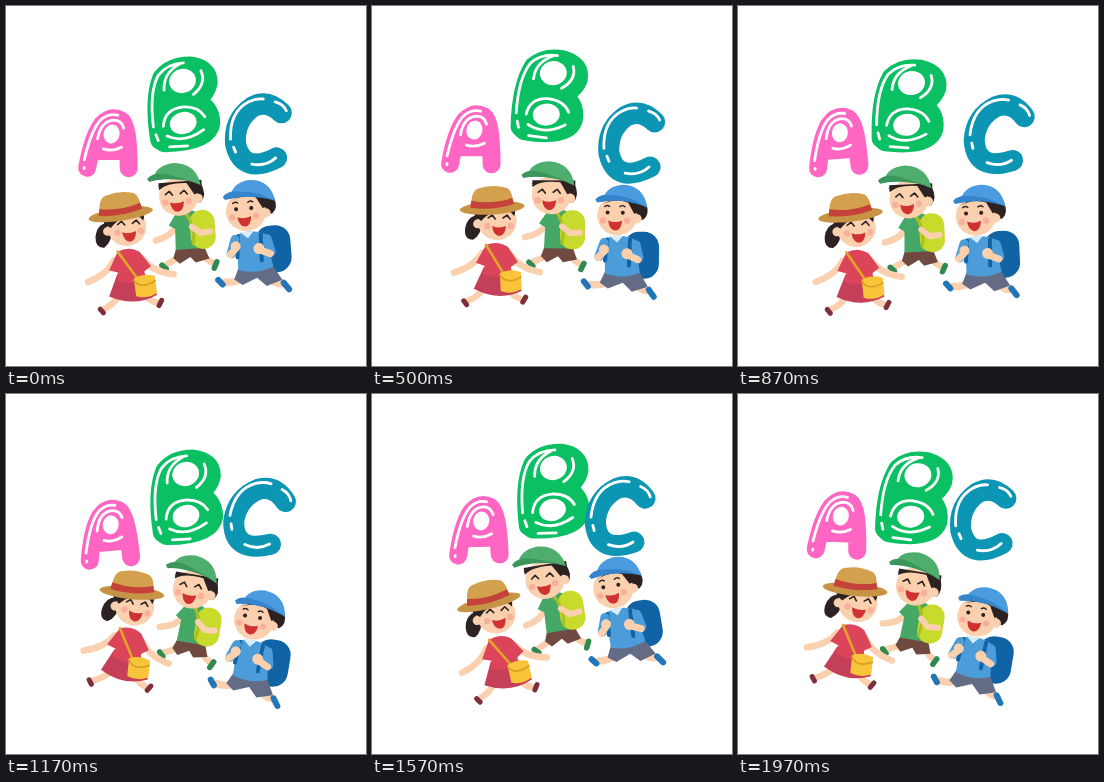
Recreate the animation shown at these times as an HTML page. Size 360x360 px, loop 2000 ms.

```html
<!DOCTYPE html>
<html lang="en">
<head>
<meta charset="utf-8">
<title>ABC kids</title>
<style>
html, body { margin: 0; width: 100%; height: 100%; overflow: hidden; background: #fff; }
svg { display: block; width: 100vw; height: 100vh; stroke-linecap: round; stroke-linejoin: round; }
</style>
</head>
<body>
<svg viewBox="0 0 360 360"></svg>
<script>
const SKIN = '#fbd0ae', HAIR = '#2c2221', PINK = '#ff66c4', GREEN = '#0bbf63', TEAL = '#0d95b4';

const fill = (color, d) => `<path fill="${color}" d="${d}"/>`;
const line = (color, width, d, inside = 'none') =>
  `<path fill="${inside}" stroke="${color}" stroke-width="${width}" d="${d}"/>`;
const oval = (color, x, y, rx, ry = rx, turn = 0) =>
  `<ellipse fill="${color}" cx="${x}" cy="${y}" rx="${rx}" ry="${ry}" transform="rotate(${turn} ${x} ${y})"/>`;
const shine = d => line('#fff', 2.8, d);

// Head of radius r; the ear sits on side -1 or 1, eyes are closed or round.
function face(x, y, r, ear, closed) {
  const eye = ex => closed
    ? line(HAIR, 1.6, `M${ex - 3.5} ${y - 3}l4-3l3 4`)
    : oval(HAIR, ex, y - 3, 2) + line(HAIR, 1.4, `M${ex - 3} ${y - 9}q3-2 5 0`);
  const mx = x - ear * 2;
  return oval(SKIN, x, y, r, r * .98) + oval(SKIN, x + ear * r, y + 3, 4.5)
    + [-1, 1].map(s => oval('#f8b09c', mx + s * r * .6, y + 5, 3.2) + eye(mx + s * r * .38)).join('')
    + fill('#d0332f', `M${mx - 7} ${y + 5}q7 3 14 0q-1 10-7 10q-6-1-7-10`);
}

const letterA = line(PINK, 18, 'M81 157Q86 127 95 114Q104 104 114 109Q122 114 122.5 157M91 140H120')
  + fill(PINK, 'M92 142L97 112H116L119 142Z')
  + oval('#fff', 105, 123, 8, 9.5, 12)
  + shine('M78 149Q85 117 95 108Q102 102 111 104M91 128Q94 110 107 109Q115 109 117 117M78 157v1M97 138Q106 141 115 136');

const letterB = line(GREEN, 20, 'M156 126Q152 86 162 65Q172 54 190 55Q208 58 207 72Q204 84 190 90Q208 95 207 113Q203 131 160 129Z', GREEN)
  + oval('#fff', 182, 69, 13.5, 12, -15) + oval('#fff', 180, 111, 13.5, 11, -12)
  + shine('M150 113Q148 78 158 62Q167 51 184 51M163 77Q163 60 180 52M201 60Q206 73 192 83'
    + 'M160 113Q162 96 180 95Q196 95 202 106M163 123Q180 132 200 119M152 121l2 6M165 134h18');

const letterC = line(TEAL, 21, 'M282 115Q268 101 253 109Q234 122 236 146Q243 177 277 160')
  + shine('M231 141Q230 114 249 104Q257 100 264 101M276 104Q284 106 287 113M252 166Q266 169 276 160M234 149l2 5');

const greenBoy = line(SKIN, 6.5, 'M176 254L157 263M193 254Q198 262 205 265M171 224Q165 235 149 238')
  + line('#2f8a50', 5.5, 'M153 263l4 4M205 270l3-6')
  + fill('#704a40', 'M169 246H196L201 260L187 263L182 257L171 263L165 257Z')
  + fill('#46a866', 'M172 211Q185 207 193 214L198 249H168L169 228L163 224Z')
  + `<rect x="184" y="211" width="25" height="39" rx="12" fill="#c8da2c"/>`
  + line('#a9bf22', 3, 'M180 212Q190 226 186 244')
  + line(SKIN, 6, 'M186 227L194 234L204 233')
  + fill(HAIR, 'M155 184H198Q204 196 197 203H185Z')
  + face(175, 196, 19.5, 1, true)
  + fill(HAIR, 'M156 188Q164 181 184 183L191 195L199 192V181H156Z')
  + fill('#4fae6d', 'M151 178Q153 163 173 162Q195 164 198 186Q173 174 151 178Z')
  + fill('#3a965a', 'M145 176Q151 169 166 173L194 183Q164 175 147 179Z');

const blueBoy = line(SKIN, 7.5, 'M237 278Q228 287 215 285M258 281Q263 291 272 291')
  + line('#2276b5', 6, 'M208 282l4 5M273 290l5 7')
  + `<rect x="248" y="232" width="35" height="47" rx="15" fill="#1064a6"/>`
  + fill('#646b84', 'M231 268H261L272 287L256 292L247 283L232 289L224 283Z')
  + fill('#4b9cd8', 'M229 239Q244 233 259 240L264 273Q247 280 229 274Z')
  + line('#1064a6', 4, 'M231 240L229 261M254 240L253 266')
  + line('#4b9cd8', 9, 'M228 243L223 257M260 245L263 258')
  + line(SKIN, 7, 'M222 258l6-6M262 260l-9-4')
  + oval(SKIN, 228, 250, 5) + oval(SKIN, 251, 254, 5.5)
  + fill('#d9ecf9', 'M233 236H247L241 243Z')
  + fill(HAIR, 'M228 202Q252 193 270 204Q274 215 267 220H258Z')
  + face(241, 216, 20, 1, false)
  + fill(HAIR, 'M225 205Q240 198 252 203L258 214L269 211V201L249 194Z')
  + fill('#4b9be0', 'M226 202Q229 186 247 185Q268 186 271 208Q251 196 226 202Z')
  + fill('#3585cc', 'M219 200Q224 193 239 196Q255 197 269 207Q245 198 221 203Z');

const girl = line(SKIN, 6.5, 'M109 288Q103 298 92 302M132 289Q137 298 146 300M106 254Q98 268 78 274M134 255Q143 269 164 273')
  + line('#7e2f3c', 5, 'M88 302l3 4M147 303l3-5')
  + fill('#c43f58', 'M108 268H134L146 292Q123 303 98 290Z')
  + fill('#dc4459', 'M110 246Q122 241 132 248L142 263L135 268L136 276Q121 281 107 275L109 267L100 264Z')
  + fill(HAIR, 'M103 216Q91 217 89 230Q88 241 97 241Q105 236 106 224Z')
  + fill(HAIR, 'M98 208H138V222L110 236Q98 228 98 208Z')
  + face(121, 222, 19.5, -1, true)
  + fill(HAIR, 'M100 207H138Q140 213 138 217Q133 210 125 210Q113 213 105 222L101 219Z')
  + oval('#c79446', 116, 209, 32.5, 6.5, -4)
  + fill('#d3a04e', 'M95 206Q95 190 104 189Q117 185 131 189Q136 192 137 204Q116 210 95 206Z')
  + fill('#c5423a', 'M95 202Q116 206 136 199L138 205Q117 212 94 209Z')
  + line('#e0a526', 2.6, 'M110 246L128 275')
  + fill('#f8c43a', 'M124 274Q134 269 145 273L146 290Q136 296 125 292Z')
  + line('#d99e22', 1.6, 'M124 276Q131 286 145 278');

const wave = (t, period, peak) => Math.cos(2 * Math.PI * (t - peak) / period);

// Each part drifts along a smooth curve through a few points while it sways.
const beats = [0, .33, .67, .87, 1.17, 1.57, 1.97];
const parts = [
  { art: letterA, pivot: [102.5, 132],
    x: [103, 102, 98, 100, 103, 107, 100], y: [137, 132, 135, 136, 140, 136, 131],
    turn: t => 3.5 * wave(t, 1.75, 2) - 1.5 },
  { art: letterB, pivot: [181, 92],
    x: [177, 181, 173, 171, 180, 181, 176], y: [98, 92, 90, 100, 103, 97, 104],
    turn: t => 6 * wave(t, 1.45, .6) + 1.5 },
  { art: letterC, pivot: [259.5, 135],
    x: [253, 259, 261, 261, 253, 248, 246], y: [127, 135, 135, 127, 122, 121, 125],
    turn: t => 8 * wave(t, 1.9, 1.2) + 5 },
  // The kids settle at first, then rock harder and harder up to a full swing.
  { art: greenBoy + blueBoy + girl, pivot: [182, 240],
    x: [183, 182, 189, 180, 186, 187, 177], y: [234, 240, 227, 237, 240, 228, 237],
    turn: t => 9.5 * Math.min(1, t / 1.17) ** 3 * wave(t, .8, 1.17) - 4.5 * Math.exp(-8 * t) }
];

function slope(values, i) {
  const p = Math.max(i - 1, 0), q = Math.min(i + 1, beats.length - 1);
  return (values[q] - values[p]) / (beats[q] - beats[p]);
}

function curve(values, t) {
  let i = 0;
  while (i < beats.length - 2 && t >= beats[i + 1]) i++;
  const d = beats[i + 1] - beats[i], u = Math.min((t - beats[i]) / d, 1), v = 1 - u;
  return v * v * (1 + 2 * u) * values[i] + u * u * (3 - 2 * u) * values[i + 1]
    + d * u * v * (v * slope(values, i) - u * slope(values, i + 1));
}

const svg = document.querySelector('svg');
svg.innerHTML = parts.map(p => `<g>${p.art}</g>`).join('');

// 30 steps a second; the loop cuts hard after two seconds.
function draw(ms) {
  const t = Math.floor(ms % 2000 * .03 + .01) / 30;
  parts.forEach(({ pivot: [px, py], x, y, turn }, i) => svg.children[i].setAttribute('transform',
    `translate(${curve(x, t)} ${curve(y, t)}) rotate(${turn(t)}) translate(${-px} ${-py})`));
}

let start;
function tick(now) {
  start ??= now;
  draw(now - start);
  requestAnimationFrame(tick);
}
draw(0);
requestAnimationFrame(tick);
</script>
</body>
</html>
```
